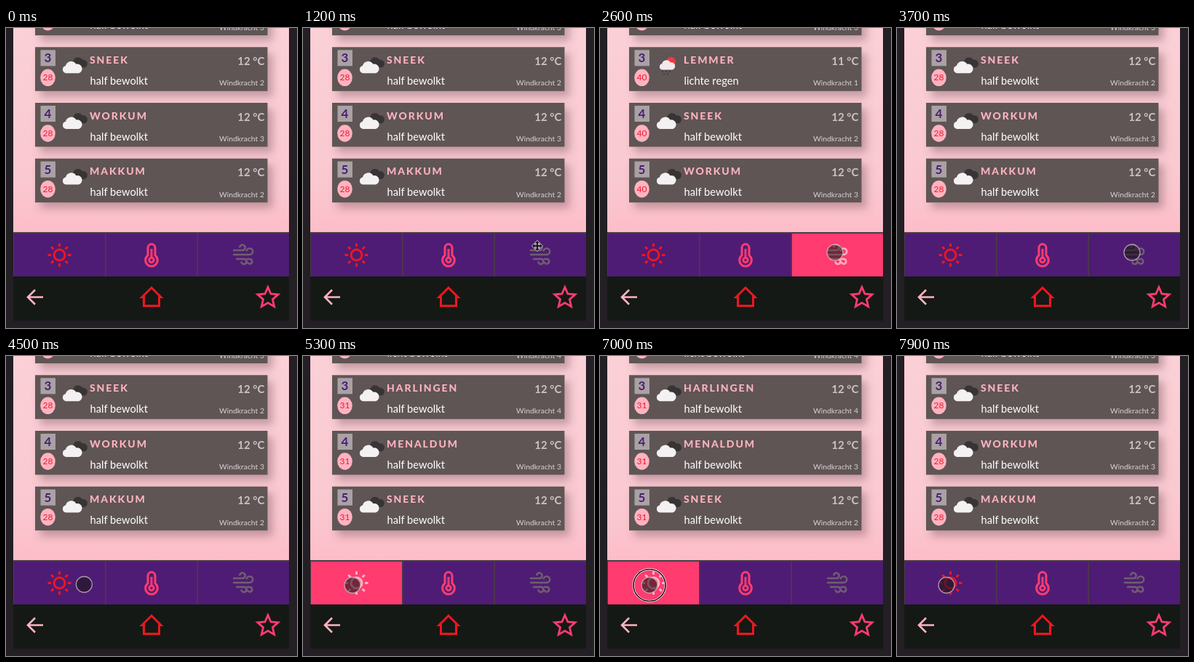
An HTML page that plays this animation: 400 by 413 pixels, repeating every 8000 ms.

```html
<!DOCTYPE html>
<html lang="nl">
<head>
<meta charset="utf-8">
<title>Weerlijst</title>
<style>
  html, body { margin: 0; width: 100%; height: 100%; overflow: hidden; background: #231f24; }
  svg { display: block; width: 400px; height: 413px; }
  text { font-family: Lato, "Open Sans", sans-serif; }
  .city { font-size: 14px; font-weight: 800; letter-spacing: 1.9px; fill: #ffb3c1; }
  .sky { font-size: 14.7px; fill: #fff; }
  .temp { font-size: 15px; font-weight: 700; fill: #cbc2c4; text-anchor: end; }
  .wind { font-size: 10.4px; fill: #d9d1d3; text-anchor: end; }
  .rank { font-size: 17px; font-weight: 700; fill: #4b1d73; text-anchor: middle; }
  .score { font-size: 12px; fill: #ee1c2e; text-anchor: middle; }
  .icon { fill: none; stroke-width: 3; }
</style>
</head>
<body>
<svg viewBox="0 0 400 413">
  <defs>
    <linearGradient id="pink" x1="0" y1="0" x2="0" y2="1">
      <stop offset="0" stop-color="#fbd0d7"/>
      <stop offset=".75" stop-color="#fac8d0"/>
      <stop offset="1" stop-color="#fdbdc9"/>
    </linearGradient>
    <filter id="shade" x="-10%" y="-30%" width="125%" height="180%">
      <feDropShadow dx="7" dy="8" stdDeviation="6" flood-color="#6b4850" flood-opacity=".38"/>
    </filter>
    <g id="cloudShape">
      <path d="M5 20a5.3 5.3 0 0 1-.4-10.4A8.2 8.2 0 0 1 19.600 7.200A5.600 5.600 0 0 1 23 20Z"/>
    </g>
    <g id="cloudy">
      <use href="#cloudShape" transform="translate(11 -3) scale(.84)" fill="#383435"/>
      <use href="#cloudShape" transform="translate(0 2) scale(.97)" fill="#f4f1f3"/>
    </g>
    <g id="rain">
      <circle cx="20" cy="5.500" r="6.500" fill="#ee3a40"/>
      <use href="#cloudShape" transform="translate(4 1) scale(.78)" fill="#f1eaec"/>
      <path d="M9 18l-1 2M14 18l-1 2M19 18l-1 2M11 22l-1 2M16 22l-1 2" stroke="#393335" stroke-width="1.300"/>
    </g>
  </defs>

  <rect width="400" height="413" fill="#231f24"/>
  <rect x="10" width="379" height="282" fill="url(#pink)"/>
  <g id="list"></g>

  <rect x="10" y="281" width="379" height="62" fill="#4b3d46"/>
  <g id="tabs" fill="#4e1c74">
    <rect x="11" y="283" width="125" height="59"/>
    <rect x="137.500" y="283" width="125" height="59"/>
    <rect x="264" y="283" width="125" height="59"/>
  </g>
  <rect x="10" y="342" width="379" height="61" fill="#141915"/>

  <g id="sun" class="icon" transform="translate(73.500 312.500)"><circle r="7.500"/></g>
  <g class="icon" stroke="#ff3b70" stroke-width="2.600">
    <path d="M195 313V302.500a5 5 0 0 1 10 0V313a8.300 8.300 0 1 1-10 0Z"/>
    <circle cx="200" cy="319.500" r="3.200"/>
    <path d="M200 304v12"/>
  </g>
  <path id="gust" class="icon" style="stroke-width:2.500" stroke-linecap="round"
    d="M313 306h12a3.700 3.700 0 1 0-3.600-4.700M313 312h22a4.300 4.300 0 1 0-4.200-5.500M317 318h10a3.500 3.500 0 1 1-3.400 4.500M332 318h3a3.300 3.300 0 1 1-3 4.700"/>

  <path class="icon" style="stroke-width:2.600" stroke="#ffb3c1" d="M51 370.500H30M40 360.500L30 370.500L40 380.500"/>
  <path class="icon" stroke="#ee1620" d="M187 370.500L200 357.500L213 370.500H210.500V382.500H189.500V370.500Z"/>
  <path id="star" class="icon" style="stroke-width:2.800" stroke="#ff3b70"/>

  <g id="cross">
    <path id="arrows" stroke-linejoin="round"
      d="M0-7L3-4H1V-1H4V-3L7 0L4 3V1H1V4H3L0 7L-3 4H-1V1H-4V3L-7 0L-4-3V-1H-1V-4H-3Z"
      fill="#151015" stroke="#d8d0dc" stroke-width="1.500" paint-order="stroke"/>
  </g>
  <g id="touch">
    <circle r="11" fill="#1c1519" fill-opacity=".6" stroke="#c9bfc5" stroke-opacity=".75" stroke-width="1.300"/>
    <g id="ring" fill="none">
      <circle r="22" stroke="#fff" stroke-width="3"/>
      <circle r="22" stroke="#141014" stroke-width="1.600"/>
    </g>
  </g>
</svg>

<script>
const LOOP = 8000;
const WIND = [323, 309], SUN = [68, 315.5];
const TAPS = [2000, 3500, 4900, 7100];
const RING_TIME = 220;

const $ = id => document.getElementById(id);
const clamp = v => Math.max(0, Math.min(1, v));
const ease = v => v * v * (3 - 2 * v);
const mix = (a, b, k) => a + (b - a) * k;
const place = (el, x, y) => el.setAttribute('transform', `translate(${x} ${y})`);
const show = (el, on) => el.style.display = on ? '' : 'none';

const half = 'half bewolkt';
const lists = {
  none: { score: 28, rows: [['LEMMER', half, 12, 3], ['SNEEK', half, 12, 2],
    ['WORKUM', half, 12, 3], ['MAKKUM', half, 12, 2]] },
  wind: { score: 40, rows: [['JOURE', half, 12, 3], ['LEMMER', 'lichte regen', 11, 1],
    ['SNEEK', half, 12, 2], ['WORKUM', half, 12, 3]] },
  sun: { score: 31, rows: [['FRANEKER', 'licht bewolkt', 12, 4], ['HARLINGEN', half, 12, 4],
    ['MENALDUM', half, 12, 3], ['SNEEK', half, 12, 2]] }
};

function card([city, sky, temp, force], i, score) {
  const icon = sky === 'lichte regen' ? 'rain' : 'cloudy';
  return `<g transform="translate(40 ${26.3 + (i - 1) * 76.7})">
    <rect width="319.500" height="60.500" fill="#5f5455" filter="url(#shade)"/>
    <rect x="7.500" y="4" width="20.500" height="22" fill="#aaa1a5"/>
    <text class="rank" x="17.500" y="21">${i + 2}</text>
    <ellipse cx="17.500" cy="42" rx="10.300" ry="11.800" fill="#ffb3c1"/>
    <text class="score" x="17.500" y="46">${score}</text>
    <use href="#${icon}" x="37.500" y="14.500"/>
    <text class="city" x="75" y="22.500">${city}</text>
    <text class="sky" x="75.500" y="51.500">${sky}</text>
    <text class="temp" x="315.500" y="24.500">${temp} °C</text>
    <text class="wind" x="315" y="53">Windkracht ${force}</text>
  </g>`;
}

for (const [name, { score, rows }] of Object.entries(lists)) {
  $('list').insertAdjacentHTML('beforeend',
    `<g id="list-${name}">${rows.map((r, i) => card(r, i, score)).join('')}</g>`);
}

let rays = '';
for (let i = 0; i < 8; i++) {
  rays += `<path d="M0-16V-11.500" transform="rotate(${i * 45})"/>`;
}
$('sun').insertAdjacentHTML('beforeend', rays);

let star = '';
for (let i = 0; i < 10; i++) {
  const a = i * Math.PI / 5, r = i % 2 ? 6.8 : 14.8;
  star += `${i ? 'L' : 'M'}${360 + r * Math.sin(a)} ${371.5 - r * Math.cos(a)}`;
}
$('star').setAttribute('d', star + 'Z');

function modeAt(t) {
  if (t >= TAPS[0] && t < TAPS[1]) return 'wind';
  if (t >= TAPS[2] && t < TAPS[3]) return 'sun';
  return 'none';
}

function draw(t) {
  const mode = modeAt(t);
  for (const name in lists) show($('list-' + name), name === mode);
  const tabs = $('tabs').children;
  tabs[0].setAttribute('fill', mode === 'sun' ? '#ff3b70' : '#4e1c74');
  tabs[2].setAttribute('fill', mode === 'wind' ? '#ff3b70' : '#4e1c74');
  $('sun').setAttribute('stroke', mode === 'sun' ? '#ffb3c1' : '#ee1620');
  $('gust').setAttribute('stroke', mode === 'wind' ? '#ffb3c1' : '#705e70');

  show($('cross'), t >= 1000 && t < 1500);
  const y = t < 1200 ? mix(265, 300, ease(clamp((t - 1000) / 200)))
                     : mix(300, WIND[1], ease(clamp((t - 1200) / 300)));
  place($('cross'), 322, y);

  const k = ease(clamp((t - 4050) / 600));
  show($('touch'), t >= 1500);
  place($('touch'), mix(WIND[0], SUN[0], k), mix(WIND[1], SUN[1], k));

  const tap = TAPS.find(at => t >= at - RING_TIME && t < at);
  show($('ring'), tap !== undefined);
}

const start = performance.now();
function tick() {
  draw((performance.now() - start) % LOOP);
  requestAnimationFrame(tick);
}
draw(0);
requestAnimationFrame(tick);
</script>
</body>
</html>
```
